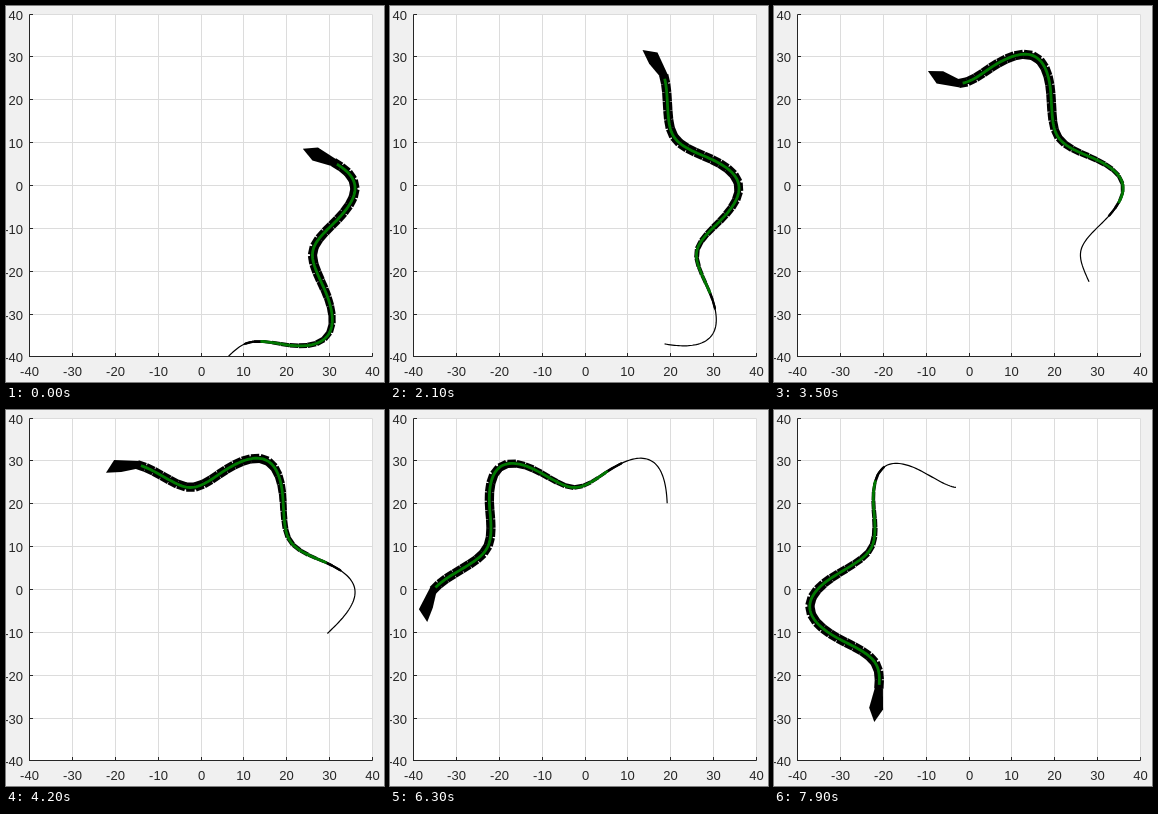
These frames come from a looping animation (378 by 376 pixels, 8000 ms). An HTML page with a canvas:

```html
<!DOCTYPE html>
<html lang="en">
<head>
<meta charset="utf-8">
<title>Snake plot</title>
<style>
html, body { margin: 0; width: 100%; height: 100%; overflow: hidden; background: #f0f0f0; }
canvas { display: block; }
</style>
</head>
<body>
<canvas id="stage" width="378" height="376"></canvas>
<script>
const ctx = document.getElementById('stage').getContext('2d');
const LEFT = 23.5, RIGHT = 366.5, TOP = 8.5, BOTTOM = 350.5;
const STEPS = 80, STEP_MS = 100;

// Points where the winding track changes from a right bend to a left one and back.
const nodes = [
  [147, 335], [212, 361], [275, 338], [317, 280], [326, 219], [314, 150], [277, 90],
  [212, 65], [150, 62.5], [100, 102], [62, 165], [71, 232], [102.5, 296], [148, 334]
];
const SWING = 47 * Math.PI / 180; // heading swing to either side of the general course

function direction(a, b) {
  const dx = b[0] - a[0], dy = b[1] - a[1], len = Math.hypot(dx, dy) || 1;
  return [dx / len, dy / len];
}

// Heading at a node: the mean course there, swung left or right in turn.
function heading(i) {
  const last = nodes.length - 1;
  const before = Math.max(i, 1), after = Math.min(i, last - 1);
  const a = direction(nodes[before - 1], nodes[before]);
  const b = direction(nodes[after], nodes[after + 1]);
  const angle = Math.atan2(a[1] + b[1], a[0] + b[0]) + (i % 2 ? -SWING : SWING);
  return [Math.cos(angle), Math.sin(angle)];
}

// Sample the bends at even arc length.
const SPACING = 0.25;
const points = [];
(function sampleTrack() {
  let length = 0, last = nodes[0];
  for (let i = 0; i < nodes.length - 1; i++) {
    const a = nodes[i], b = nodes[i + 1], ha = heading(i), hb = heading(i + 1);
    const bend = Math.acos(ha[0] * hb[0] + ha[1] * hb[1]) / 2;
    const pull = Math.hypot(b[0] - a[0], b[1] - a[1]) * (1.2 + 0.8 * bend);
    for (let u = 0; u < 1; u += 0.001) {
      const v = 1 - u;
      const p = [0, 1].map(k => a[k] * v * v * (1 + 2 * u) + b[k] * u * u * (3 - 2 * u)
        + pull * u * v * (ha[k] * v - hb[k] * u));
      length += Math.hypot(p[0] - last[0], p[1] - last[1]);
      last = p;
      if (length >= points.length * SPACING) points.push(p);
    }
  }
})();

function at(s) {
  const i = Math.round(s / SPACING);
  return points[Math.max(0, Math.min(points.length - 1, i))];
}

function tangent(s) {
  return direction(at(s - 2), at(s + 2));
}

function nearest(x, y) {
  const dist = p => Math.hypot(p[0] - x, p[1] - y);
  return points.reduce((best, p, i) => dist(p) < dist(points[best]) ? i : best, 0) * SPACING;
}

const start = nearest(309, 148.5), end = nearest(101.5, 298.5);
const bodyLength = end - nearest(182, 76);

// Speed up evenly, then cruise.
function travel(step) {
  const slow = 4.2, fast = 8.55, ramp = 34;
  const t = Math.min(step, ramp);
  return slow * t + (fast - slow) * t * t / (2 * ramp) + fast * (step - t);
}

function headPlace(step) {
  return start + (end - start) * travel(step) / travel(STEPS - 1);
}

// Body width at a distance from the tail tip.
function girth(d) {
  return Math.min(9.3, 2.8 + (d - 94) * 0.05);
}

function line(x1, y1, x2, y2, color, width = 1) {
  ctx.strokeStyle = color;
  ctx.lineWidth = width;
  ctx.beginPath();
  ctx.moveTo(x1, y1);
  ctx.lineTo(x2, y2);
  ctx.stroke();
}

function strokeTrack(from, to, width, color) {
  ctx.strokeStyle = color;
  ctx.lineWidth = width;
  ctx.beginPath();
  for (let s = from; s < to; s += 2) ctx.lineTo(...at(s));
  ctx.lineTo(...at(to));
  ctx.stroke();
}

function drawHead(head) {
  const corner = (s, along, side) => {
    const [x, y] = at(s), [tx, ty] = tangent(s);
    ctx.lineTo(x + tx * along - ty * side, y + ty * along + tx * side);
  };
  ctx.fillStyle = '#000';
  ctx.beginPath();
  corner(head, 13.5, 0);
  corner(head, 0, 7);
  corner(head - 21, 0, 4);
  corner(head - 21, 0, -4);
  corner(head, 0, -7);
  ctx.fill();
}

function drawSnake(head) {
  const tail = head - bodyLength, thin = tail + 94, neck = head - 20, seg = 9;
  strokeTrack(tail, thin, 1.2, '#000');

  // Straight, flat-ended pieces open into thin wedges on the outside of bends.
  for (let s = neck; s > thin - seg; s -= seg) {
    const width = girth(s - seg / 2 - tail);
    const a = at(s - seg), b = at(s), [dx, dy] = direction(a, b);
    line(a[0] + dx * 0.25, a[1] + dy * 0.25, b[0] - dx * 0.25, b[1] - dy * 0.25, '#000', width);
    strokeTrack(s - seg - 1, s, Math.max(2, width * 0.5), '#000');
  }
  strokeTrack(thin, neck - 4, 2.8, '#007800');
  drawHead(head);
}

function eachTick(draw) {
  for (let k = -4; k <= 4; k++) {
    const x = Math.floor(LEFT + (RIGHT - LEFT) * (k + 4) / 8) + 0.5;
    const y = 179.5 - Math.sign(k) * Math.round(42.85 * Math.abs(k));
    draw(x, y, k * 10);
  }
}

function drawGrid() {
  ctx.fillStyle = '#f0f0f0';
  ctx.fillRect(0, 0, 378, 376);
  ctx.fillStyle = '#fff';
  ctx.fillRect(LEFT, TOP, RIGHT - LEFT, BOTTOM - TOP);
  eachTick((x, y) => {
    line(x, TOP, x, BOTTOM, '#dcdcdc');
    line(LEFT, y, RIGHT, y, '#dcdcdc');
  });
}

function drawAxes() {
  const ink = '#262626';
  line(LEFT, TOP, LEFT, BOTTOM + 0.5, ink);
  line(LEFT, BOTTOM, RIGHT, BOTTOM, ink);
  ctx.font = '13px "Liberation Sans", Arial, sans-serif';
  eachTick((x, y, value) => {
    line(x, BOTTOM, x, BOTTOM - 3.5, ink);
    line(LEFT, y, LEFT + 3.5, y, ink);
    ctx.fillStyle = ink;
    ctx.textAlign = 'center';
    ctx.fillText(value, x, 370);
    ctx.textAlign = 'right';
    ctx.fillText(value, 17, y + 5);
  });
}

function frame() {
  const step = Math.floor(performance.now() / STEP_MS) % STEPS;
  drawGrid();
  ctx.save();
  ctx.beginPath();
  ctx.rect(LEFT, TOP, RIGHT - LEFT, BOTTOM - TOP);
  ctx.clip();
  drawSnake(headPlace(step));
  ctx.restore();
  drawAxes();
  requestAnimationFrame(frame);
}
frame();
</script>
</body>
</html>
```
